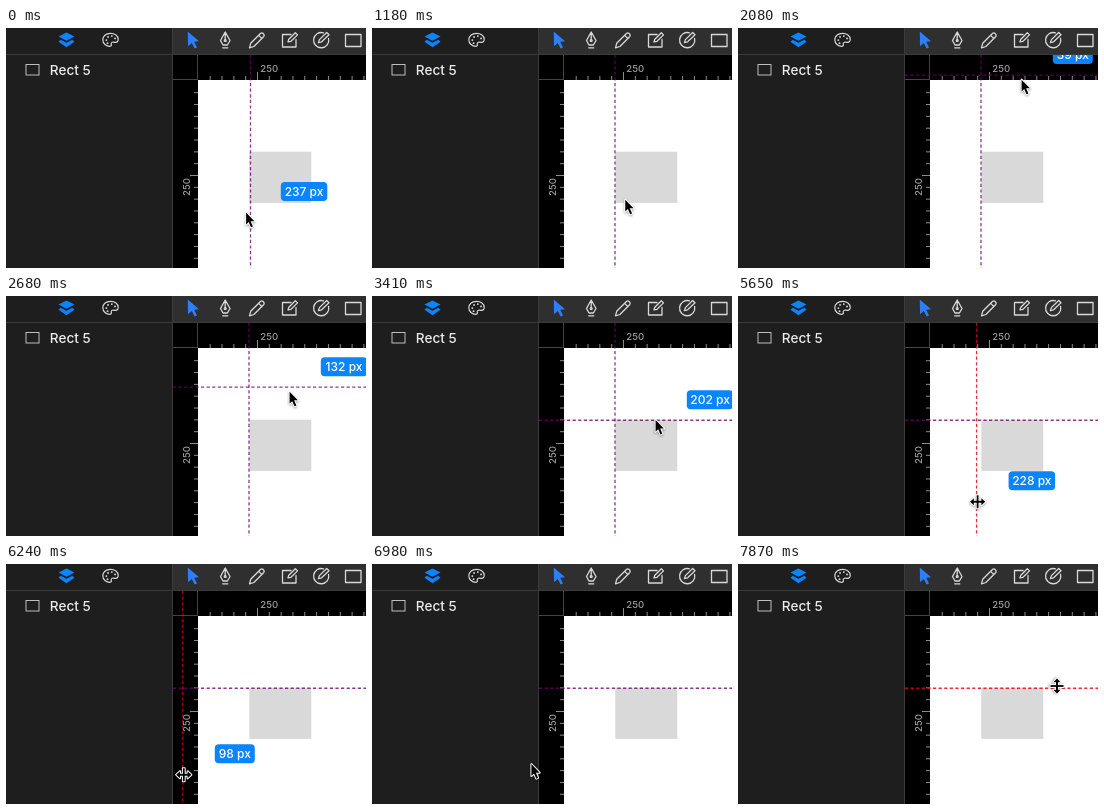
These frames come from a looping animation (360 by 240 pixels, 8000 ms). An HTML page:

```html
<!DOCTYPE html>
<html lang="en">
<head>
<meta charset="utf-8">
<title>Ruler guides</title>
<style>
html, body { margin: 0; width: 100%; height: 100%; overflow: hidden; background: #1e1e1e; }
svg { display: block; width: 360px; height: 240px; }
text { font-family: Inter, Roboto, sans-serif; font-weight: 500; }
.scale { font-size: 9.6px; fill: #9c9c9c; }
.icon { fill: none; stroke: #d8d8d8; stroke-width: 1.3; stroke-linejoin: round; stroke-linecap: round; }
.guide { stroke-width: 1.3; stroke-dasharray: 3.2 2.4; }
.halo { fill: #fff; stroke: #fff; stroke-width: 2; stroke-linejoin: round; }
.pointer { filter: drop-shadow(0 1px 1px rgba(0, 0, 0, .35)); }
</style>
</head>
<body>
<svg viewBox="0 0 360 240">
  <defs>
    <path id="arrowShape" d="M.6 1.6V13.4L3.2 11L5.5 16.2L7.4 15.4L5.1 10.2H8.9Z"/>
    <path id="resizeShape" d="M-7.6 0L-3.8-3.6V-.9H-.9V-6.5H.9V-.9H3.8V-3.6L7.6 0L3.8 3.6V.9H.9V6.5H-.9V.9H-3.8V3.6Z"/>
    <clipPath id="work"><rect x="167" y="27" width="193" height="213"/></clipPath>
  </defs>

  <rect x="192" y="52" width="168" height="188" fill="#fff"/>
  <rect x="243.3" y="123.7" width="62" height="51.2" fill="#d9d9d9"/>

  <path d="M167 27H360V52H192V240H167Z" fill="#000"/>
  <path d="M167 51.5H192M191.5 27V52" stroke="#444" fill="none"/>
  <path id="ticks" stroke="#8c8c8c" fill="none"/>
  <text class="scale" x="254.3" y="44">250</text>
  <text class="scale" transform="translate(184 168) rotate(-90)">250</text>

  <g clip-path="url(#work)">
    <line id="hGuide" class="guide" x1="167" x2="360"/>
    <line id="vGuide" class="guide" y1="27" y2="240"/>
  </g>

  <g id="badge">
    <rect id="pill" height="19" rx="4" fill="#0a84ff"/>
    <text id="value" y="13.8" font-size="12" fill="#fff" text-anchor="middle"></text>
  </g>

  <rect width="166" height="240" fill="#1e1e1e"/>
  <rect x="167" width="193" height="26" fill="#2f2f30"/>
  <path d="M0 26.5H360M166.5 0V240" stroke="#3b3b3b"/>

  <g fill="#0a84ff">
    <path d="M60.5 4.5L68.5 8.6L60.5 12.8L52.5 8.6Z"/>
    <path d="M54.6 11.8L60.5 14.8L66.4 11.8L68.5 13.8L60.5 19.2L52.5 13.8Z"/>
  </g>
  <g class="icon">
    <path d="M104.5 5.3C99.8 5.3 96.8 8.2 96.8 11.7C96.8 15.6 100.3 18.3 103.8 18.3C106 18.3 105.3 16.6 105.2 15.7C105.2 14 107 14 109 14.3C111.5 14.5 112.2 13 112.2 11.2C112.2 7.6 108.8 5.3 104.5 5.3Z" stroke-width="1.2"/>
    <path d="M100.3 12.1h.1M102 8.9h.1M105.8 8.1h.1M109 10.4h.1M101.5 15.2h.1" stroke-width="1.8"/>
    <path d="M219.2 4L214.5 12.5L217 17H221.4L224 12.5ZM219.2 5V12M216.7 19.8H221.8"/>
    <circle cx="219.2" cy="12.6" r="1"/>
    <path d="M243.5 19.8L244.7 15.3L254.7 5.3Q256 4.4 257.4 5.8Q258.8 7.2 257.8 8.5L247.9 18.5ZM252.7 7.4L255.7 10.4"/>
    <path d="M285 6.5H276.5V19H290V11.5M282 13.8L282.8 11.2L289.3 4.7L291.5 6.9L285 13.3Z"/>
    <path d="M317.5 4.9A7.6 7.6 0 1 0 322.6 10.5M312.4 14.6L313.4 11.6L320.7 4.5L323 6.8L315.6 13.8Z"/>
    <rect x="339.5" y="6.5" width="15.5" height="12"/>
  </g>
  <path d="M181.8 3.5L193 13.2L188.2 13.8L191 19.4L188.6 20.5L185.8 14.9L182 18.2Z" fill="#2d7ff9"/>

  <rect x="20" y="36.5" width="13" height="10.5" fill="none" stroke="#bdbdbd"/>
  <text x="43.8" y="46.7" font-size="13.6" fill="#ececec">Rect 5</text>

  <g id="arrow" class="pointer"><use href="#arrowShape" class="halo"/><use href="#arrowShape"/></g>
  <g id="resize" class="pointer"><use href="#resizeShape" class="halo"/><use href="#resizeShape"/></g>
</svg>
<script>
const LOOP = 8000;
const UNIT = 0.4731; // screen pixels per document pixel
const PURPLE = '#6a006a', RED = '#e6000c';
const REST_X = 243, REST_Y = 124.25; // where the guides snap to the shape
const $ = id => document.getElementById(id);
const mix = (a, b, k) => a + (b - a) * k;
const sway = (k, p) => k ** p / (k ** p + (1 - k) ** p);

// Progress in n jumps, the first at time a and the last at time b.
function hops(t, a, b, n) {
  const i = Math.floor((t - a + 6) * (n - 1) / (b - a)) + 1;
  return Math.max(0, Math.min(n, i)) / n;
}

function drawTicks() {
  let d = '';
  for (let i = -8; i <= 10; i++) {
    const x = 251.5 + i * 25 * UNIT;
    const y = 147.5 + i * 25 * UNIT;
    const len = i % 10 ? 4 : 8;
    if (x > 193 && x < 360) d += `M${x} 52v${-len}`;
    if (y > 53 && y < 240) d += `M192 ${y}h${-len}`;
  }
  $('ticks').setAttribute('d', d);
}

function pose(t) {
  if (t < 1030) { // settle the vertical guide
    const k = hops(t, 150, 730, 5), v = mix(244.5, REST_X, k);
    return { x: mix(239.5, 237.5, k), y: 183, v,
      badge: { x: v + 30.3, y: 163.5, n: mix(237, 235, k) } };
  }
  if (t < 2080) { // travel to the top ruler
    const k = hops(t, 1030, 1780, 6);
    return { x: mix(237.5, 283, k), y: mix(183, 36, sway(k, 3.37)), v: REST_X };
  }
  if (t < 3710) { // pull out the horizontal guide
    const k = hops(t, 2080, 3120, 8), h = mix(36, REST_Y, k);
    const n = k < 1 ? 202 + (h - REST_Y) / UNIT : 200 + 2 * hops(t, 3260, 3410, 2);
    return { x: 283, y: k < 1 ? h + 3 : 122.3, v: REST_X, h,
      badge: { x: 314.8, y: h - 20.5, n } };
  }
  if (t < 5350) { // travel to the vertical guide
    const k = sway(hops(t, 3710, 4750, 8), 2), x = mix(283, 244, k);
    return { x, y: mix(122.3, 202, k), v: REST_X, h: REST_Y, hot: x < 247 ? 'v' : '' };
  }
  if (t < 6830) { // drag it off the canvas
    const k = hops(t, 5350, 6390, 8), v = mix(REST_X, 141.5, k ** 3.2);
    const y = mix(202, 212, k);
    return { x: v + 1, y, v, h: REST_Y, hot: 'v',
      badge: t < 6540 && { x: v + 32, y: y - 21, n: 98 + (v - 177) / UNIT } };
  }
  // travel to the horizontal guide
  const k = sway(hops(t, 6830, 7870, 8), 2), y = mix(207, 122, k);
  return { x: mix(141, 319, k), y, h: REST_Y, hot: y < 125 ? 'h' : '' };
}

function show(id, on) { $(id).style.display = on ? '' : 'none'; }

function guide(axis, at, hot) {
  const line = $(axis + 'Guide'), c = axis === 'v' ? 'x' : 'y';
  show(line.id, at !== undefined);
  if (at === undefined) return;
  line.setAttribute(c + 1, at);
  line.setAttribute(c + 2, at);
  line.setAttribute('stroke', hot ? RED : PURPLE);
  line.setAttribute('opacity', hot ? 0.82 : 0.78);
}

function badge(b) {
  show('badge', b);
  if (!b) return;
  const n = Math.round(b.n), w = n < 100 ? 40 : 46.5;
  $('badge').setAttribute('transform', `translate(${b.x} ${b.y - 9.5})`);
  $('pill').setAttribute('width', w);
  $('value').setAttribute('x', w / 2);
  $('value').textContent = n + ' px';
}

function render(t) {
  const p = pose(t);
  guide('v', p.v, p.hot === 'v');
  guide('h', p.h, p.hot === 'h');
  badge(p.badge);
  show('arrow', !p.hot);
  show('resize', p.hot);
  $(p.hot ? 'resize' : 'arrow').setAttribute('transform',
    `translate(${p.x} ${p.y}) rotate(${p.hot === 'h' ? 90 : 0})`);
}

drawTicks();
const start = performance.now();
function tick() {
  render((performance.now() - start) % LOOP);
  requestAnimationFrame(tick);
}
tick();
</script>
</body>
</html>
```
